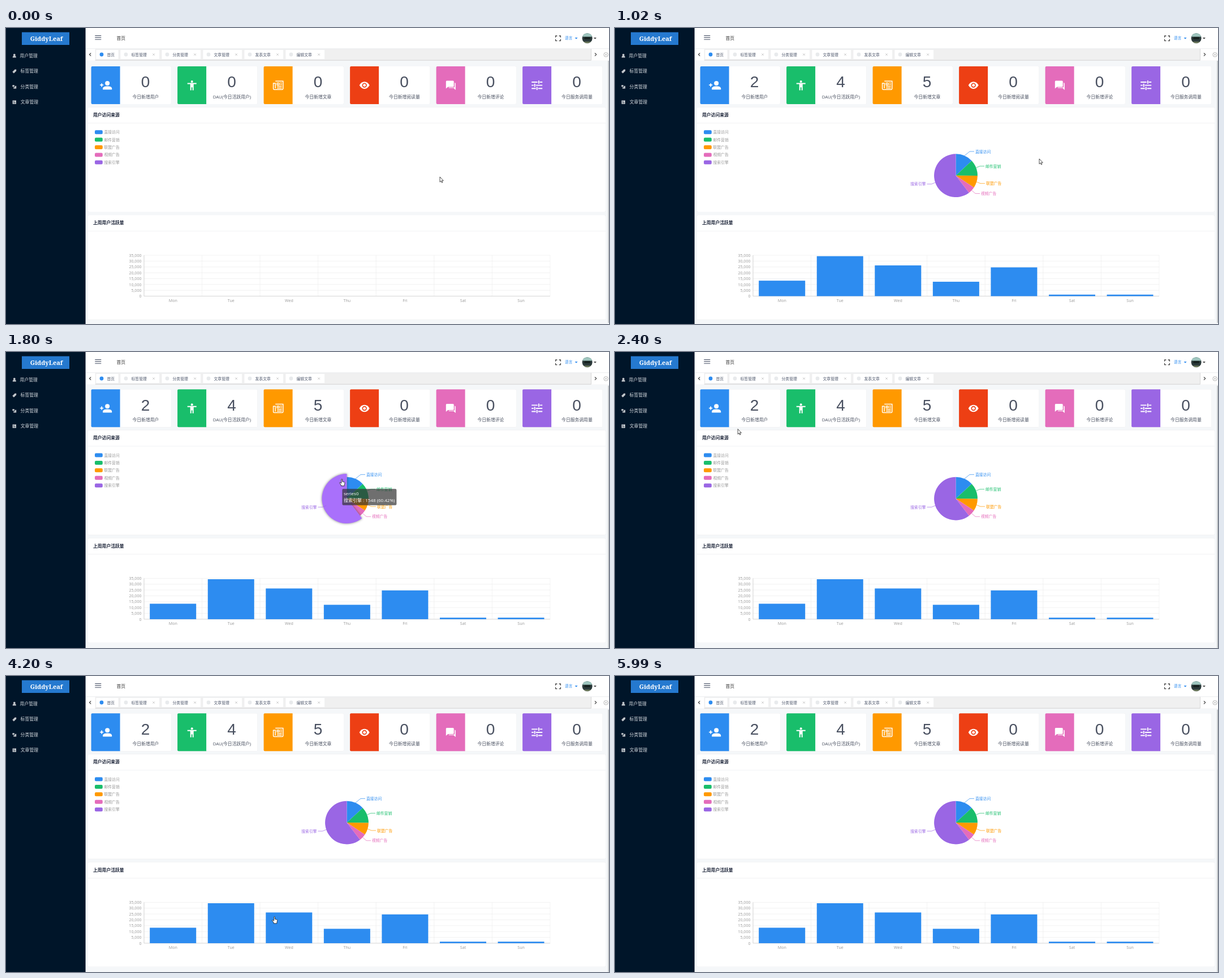
These frames come from a looping animation (1066x525 px, 7010 ms). An HTML page:

```html
<!DOCTYPE html>
<html lang="zh-CN">
<head>
<meta charset="utf-8">
<title>Dashboard</title>
<style>
html, body { margin: 0; width: 100%; height: 100%; overflow: hidden; background: #f5f7f9; }
svg { display: block; width: 1066px; height: 525px; }
text { font-family: "Open Sans", "Noto Sans CJK SC", "Noto Sans CJK", sans-serif; white-space: pre; }
.num { font-family: "Liberation Sans", sans-serif; }
.brand { font-family: "Noto Serif", serif; font-weight: 700; }
.card { filter: drop-shadow(0 .6px .5px rgba(0, 0, 0, .12)); }
.lift { filter: drop-shadow(0 0 2px rgba(0, 0, 0, .5)); }
</style>
</head>
<body>
<svg id="stage" viewBox="0 0 1066 525"></svg>
<script>
const LOOP = 7010, TICK = 77.6, FIRST = 90;
const BLUE = '#2d8cf0', GREEN = '#19be6b', ORANGE = '#ff9900', RED = '#ed3f14', PINK = '#e46cbb', PURPLE = '#9a66e4';
const PIE = { x: 602.5, y: 261.7, r: 38.4, big: 44 };
const AXIS = { x: 244, y: 475.6, col: 102.55, h: 72.5, max: 35000 };

const rect = (x, y, w, h, fill, more = '') => `<rect x="${x}" y="${y}" width="${w}" height="${h}" fill="${fill}" ${more}/>`;
const path = (d, fill, more = '') => `<path d="${d}" fill="${fill}" ${more}/>`;
const line = (d, color, w = 1, more = '') => path(d, 'none', `stroke="${color}" stroke-width="${w}" ${more}`);
const dot = (x, y, r, fill, more = '') => `<circle cx="${x}" cy="${y}" r="${r}" fill="${fill}" ${more}/>`;
const text = (s, x, y, size, fill, more = '') =>
  `<text x="${x}" y="${y + size * .37}" font-size="${size}" fill="${fill}" ${more}>${s}</text>`;
const MID = 'text-anchor="middle"', END = 'text-anchor="end"';

// Icons are drawn around 0,0
const icons = [
  dot(3, -3.6, 4, '#fff') + path('M-5 7.6v-2q0-4 8-4t8 4v2z', '#fff') + line('M-7-3.4v6M-10-.4h6', '#fff', 1.8),
  dot(0, -6.6, 2, '#fff') + path('M-8-4.2H8v2H3V8.8H1V3.6H-1V8.8H-3V-2.2H-8z', '#fff'),
  line('M-5-7.4H8.6V6q0 1.6-1.6 1.6H-7Q-8.6 7.6-8.6 6V-3.6H-5V5.5M-2-4H1.6V-.6H-2zM3.6-4H6.5M3.6-1H6.5M-2 2H6.5M-2 4.8H6.5', '#fff', 1.5),
  path('M-9 0Q-5.5-6.3 0-6.3T9 0Q5.5 6.3 0 6.3T-9 0z', '#fff') + dot(0, 0, 4.2, RED) + dot(0, 0, 2.5, '#fff'),
  path('M-7-8H4q1.5 0 1.5 1.5V1.5Q5.5 3 4 3H-5l-3.4 3V-6.5Q-8.4-8-7-8zM7-4.5q1.6 0 1.6 1.6V8.4L5.2 5H-2.5q-1.2 0-1.2-1H5.4Q7 4 7 2.4z', '#fff'),
  line('M-9.5-5.6H1M5-5.6H9.5M3.2-8.4v5.6M-9.5 0H-6M-2 0H9.5M-4-2.8v5.6M-9.5 5.6H-2M2 5.6H9.5M0 2.8v5.6', '#fff', 1.9)
];
const cards = [
  ['今日新增用户', BLUE, 2, 85], ['DAU(今日活跃用户)', GREEN, 4, 210], ['今日新增文章', ORANGE, 5, 210],
  ['今日新增阅读量', RED, 0, 210], ['今日新增评论', PINK, 0, 210], ['今日服务调用量', PURPLE, 0, 210]
];
// name, value, colour, hover colour, label elbow
const slices = [
  ['直接访问', 335, BLUE, '#329aff', 627, 219], ['邮件营销', 310, GREEN, '#1cd176', 645, 245],
  ['联盟广告', 234, ORANGE, '#ffa800', 646, 275.7], ['视频广告', 135, PINK, '#fb77ce', 637, 293.6],
  ['搜索引擎', 1548, PURPLE, '#a970fb', 559.5, 276.8]
];
const total = slices.reduce((sum, s) => sum + s[1], 0);
const days = [['Mon', 13253], ['Tue', 34235], ['Wed', 26321], ['Thu', 12340], ['Fri', 24643], ['Sat', 1322], ['Sun', 1324]];
let turn = 0;
const arcs = slices.map(s => [turn, turn += s[1] / total]);

const polar = (a, r) => [PIE.x + r * Math.sin(a * 2 * Math.PI), PIE.y - r * Math.cos(a * 2 * Math.PI)];
function sector(a, b, r) {
  b = Math.min(b, a + .9999);
  return `M${PIE.x} ${PIE.y}L${polar(a, r)}A${r} ${r} 0 ${b - a > .5 ? 1 : 0} 1 ${polar(b, r)}Z`;
}

function cardView([label, color], i) {
  const x = 150.6 + i * 152.5;
  return `<g class="card">${rect(x, 68, 141.5, 67, '#fff', 'rx="2"')}</g>` +
    path(`M${x + 51} 68v67h-49q-2 0-2-2v-63q0-2 2-2z`, color) +
    `<g transform="translate(${x + 25.6} 101.6)">${icons[i]}</g>` +
    text('0', x + 96, 95, 28, '#495060', `class="num" ${MID}`) +
    text(label, x + 96.3, 122, 7.8, '#495060', MID);
}
const panel = (y, h, title) => `<g class="card">${rect(145, y, 915, h, '#fff', 'rx="2"')}</g>` +
  line(`M145 ${y + 28.2}H1060`, '#e8eaec', .6) + text(title, 154, y + 13.6, 7.8, '#1c2438', 'font-weight="700"');

function pieView() {
  return slices.map(([name, , color, , x, y], i) => {
    const [a, b] = arcs[i], dir = i === 4 ? -1 : 1;
    return path(sector(a, b, PIE.r), color, 'class="slice"') +
      line(`M${polar((a + b) / 2, PIE.r)}L${x} ${y}h${8 * dir}`, color, .7) +
      text(name, x + 10 * dir, y, 6.8, color, dir < 0 ? END : '');
  }).join('');
}
function gridView() {
  let out = '';
  for (let i = 0; i <= 7; i++) {
    const y = AXIS.y - i * AXIS.h / 7, x = AXIS.x + i * AXIS.col;
    out += line(`M${AXIS.x} ${y}h${AXIS.col * 7}M${x} ${AXIS.y}v${-AXIS.h}`, '#e9e9e9', .6) +
      text((i * 5000).toLocaleString('en-US'), 239.5, y, 7.1, '#999', END);
  }
  out += line(`M${AXIS.x} ${AXIS.y - AXIS.h}V${AXIS.y}H${AXIS.x + AXIS.col * 7}`, '#ccc', .7);
  return out + days.map(([d], i) => text(d, AXIS.x + (i + .5) * AXIS.col, 483.5, 7.1, '#999', MID) +
    rect(AXIS.x + i * AXIS.col + 10.2, 0, 82, 0, BLUE, 'class="bar"')).join('');
}

function tabsView() {
  const names = ['首页', '标签管理', '分类管理', '文章管理', '发表文章', '编辑文章'];
  return names.map((n, i) => {
    const x = i ? 202 + (i - 1) * 73 : 159;
    return rect(x, 38.5, i ? 69.5 : 40, 17, '#fff', 'rx="1.2" stroke="#e8eaec" stroke-width=".5"') +
      dot(x + 10, 47, 3.4, i ? '#e8eaec' : BLUE) + text(n, x + 19.5, 47, 6.85, '#515a6e') +
      (i ? line(`M${x + 57.3} 45.3l3.6 3.6m0-3.6l-3.6 3.6`, '#aaa', .6) : '');
  }).join('');
}
function sideView() {
  const menu = [['用户管理', 24.6, 49], ['标签管理', 25.6, 76.5], ['分类管理', 25.6, 104], ['文章管理', 25.8, 131.3]];
  const glyphs = [
    dot(0, -1.6, 1.9, '#c3c7cc') + path('M-3 3.2Q-3.4-.4 0-.4T3 3.2z', '#c3c7cc'),
    path('M-3.5 1L.8-3.2H3.4V-.6L-1 3.6z', '#c3c7cc'),
    path('M-3.4-3H0V0H-3.4zM.8-1.5H3.4V3.2H-1.5V1H.8z', '#c3c7cc'),
    path('M-3.2-3.2H3.2V3.2H-3.2z', '#c3c7cc') + line('M-1.7-1.4H.2M-1.7 1H1.8', '#001529', .8)
  ];
  return rect(0, 0, 140.6, 525, '#001529') + rect(28, 7.5, 84, 22.5, '#2579cf') +
    text('GiddyLeaf', 71.5, 18.6, 11, '#fff', `class="brand" ${MID}`) +
    menu.map(([n, x, y], i) => `<g transform="translate(14.8 ${y + .3})">${glyphs[i]}</g>` + text(n, x, y, 7.8, '#d5d9de')).join('');
}
function headView() {
  return rect(140.6, 0, 926, 36.6, '#fff') + rect(140.6, 36.6, 926, 21, '#f0f0f0') +
    line('M140.6 36.8H1066', '#e3e5e8', .6) + line('M157.5 57.2H1034', '#d2d2d2', .9) +
    rect(140.6, 37.2, 17, 20.4, '#fff') + rect(1034.5, 37.2, 31.5, 20.4, '#fff') +
    line('M1034.5 37V57.5', '#ccc', .7) +
    line('M150.2 44.3l-2.7 2.7l2.7 2.7M1041 44.3l2.7 2.7l-2.7 2.7', '#333', 1.1) +
    dot(1060.6, 47.3, 3.8, 'none', 'stroke="#888" stroke-width=".6"') + line('M1059.1 45.8l3 3m0-3l-3 3', '#888', .6) +
    line('M157.3 13.6h11M157.3 17.1h11M157.3 20.5h11', '#515a6e', 1.1) +
    text('首页', 195.4, 18, 7.8, '#333') +
    line('M974.4 14h-2.8v2.8M977.6 14h2.8v2.8M974.4 22.6h-2.8v-2.8M977.6 22.6h2.8v-2.8', '#444', 1.3) +
    text('语言', 988, 17.7, 6.7, BLUE) + path('M1005.6 17h5l-2.5 2.7z', BLUE) +
    dot(1027.6, 18.2, 9, '#2c3a3b') + path('M1019 15.5a9 9 0 0 1 17.2 0z', '#9dc4bd') +
    rect(1022, 16, 11, 4, '#16211f', 'rx="1.5"') + path('M1021 24.3h13.2a9 9 0 0 1-13.2 0z', '#6f7c5e') +
    path('M1038.9 17h5l-2.5 2.7z', '#444') + tabsView();
}

const stage = document.getElementById('stage');
stage.innerHTML = `<clipPath id="sweep"><path/></clipPath>` + rect(0, 0, 1066, 525, '#f5f7f9') +
  `<g id="page">${cards.map(cardView).join('')}${panel(140.5, 185.5, '用户访问来源')}${panel(332, 185.5, '上周用户活跃量')}` +
  slices.map(([n, , c], i) => rect(157, 181.2 + i * 13.4, 13.8, 7, c, 'rx="2"') + text(n, 173.5, 184.7 + i * 13.4, 6.8, '#999')).join('') +
  `${gridView()}<g clip-path="url(#sweep)">${pieView()}</g></g>` +
  rect(1064.2, 58, 1.8, 465, '#c4c6c9', 'id="thumb"') + headView() + sideView() +
  rect(0, 0, 1066, 1.3, BLUE, 'id="load"') +
  `<g id="tip">${rect(0, 0, 96, 29, 'rgba(50,50,50,.7)', 'rx="2.2"')}${text('series0', 2.6, 8.6, 8, '#fff')}${text('', 2.6, 20.4, 8, '#fff')}</g>` +
  `<g id="arrow">${path('M0 0V9.2L2.1 7.3L3.5 10.4L4.9 9.8L3.5 6.8H6.3z', '#fff', 'stroke="#000" stroke-width=".7"')}</g>` +
  `<g id="hand">${path('M-.9 0Q0-1 .9 0V4L4.6 5Q5.4 5.3 5.2 6.4L4.4 9.6V11.6H-1.4V10L-4 6.6Q-4.2 5.2-2.8 5.6L-.9 7z', '#fff', 'stroke="#000" stroke-width=".7"')}</g>`;

const $ = id => document.getElementById(id);
const all = sel => [...stage.querySelectorAll(sel)];
const nums = all('.num'), bars = all('.bar'), wedges = all('.slice');
const sweep = stage.querySelector('#sweep path'), tipText = all('#tip text')[1], tipBox = stage.querySelector('#tip rect');
const place = (el, x, y) => el.setAttribute('transform', `translate(${x} ${y})`);
const show = (el, on) => el.style.display = on ? '' : 'none';
const clamp = v => Math.max(0, Math.min(1, v));
const cubicOut = p => 1 - (1 - p) ** 3;
const expoOut = p => p >= 1 ? 1 : 1 - 2 ** (-10 * p);

// Pointer path: time, x, y
const route = [
  [0, 767, 264], [846, 767, 264], [1001, 750, 232], [1500, 750, 232], [1777, 594, 226], [1950, 420, 140], [2110, 310, 82],
  [2260, 243, 115], [2420, 213, 140], [2700, 450, 82], [3020, 793, 124], [3250, 775, 190], [3484, 727, 298], [3720, 736, 445],
  [4130, 405, 425], [4480, 866, 440], [4720, 1000, 360], [4870, 1056, 310], [4940, 1075, 300],
  [5400, 1075, 300], [5490, 1053, 300], [5650, 1075, 290], [5800, 1075, 290], [5880, 1053, 290], [5960, 1075, 290], [LOOP, 1075, 290]
];
function pointer(t) {
  const i = route.findIndex(k => k[0] > t), a = route[i - 1], b = route[i];
  const p = (t - a[0]) / (b[0] - a[0]);
  return [a[1] + (b[1] - a[1]) * p, a[2] + (b[2] - a[2]) * p];
}
function sliceAt(x, y) {
  const dx = x - PIE.x, dy = y - PIE.y;
  if (Math.hypot(dx, dy) > PIE.big) return -1;
  const a = (Math.atan2(dx, -dy) / (2 * Math.PI) + 1) % 1;
  return arcs.findIndex(([from, to]) => a >= from && a < to);
}

function draw(now) {
  const real = now % LOOP;
  const t = real < FIRST ? 0 : 70 + TICK * Math.floor((real - 70) / TICK);
  const p = t ? clamp((t + 11) / 1000) : 0;
  const scroll = 1.67 * clamp((t - 1079) / 232);
  place($('page'), 0, -scroll);

  cards.forEach(([, , n, start], i) => nums[i].textContent = Math.round(n * expoOut(clamp((t - start) / 800))));
  days.forEach(([, v], i) => {
    const h = v / AXIS.max * AXIS.h * expoOut(p);
    bars[i].setAttribute('height', h);
    bars[i].setAttribute('y', AXIS.y - h);
  });
  sweep.setAttribute('d', p ? sector(0, cubicOut(p), 600) : 'M0 0');

  const [x, y] = pointer(t), over = sliceAt(x, y + scroll);
  wedges.forEach((w, i) => {
    const on = i === over;
    w.setAttribute('d', sector(...arcs[i], on ? PIE.big : PIE.r));
    w.setAttribute('fill', slices[i][on ? 3 : 2]);
    w.setAttribute('class', on ? 'slice lift' : 'slice');
  });
  show($('tip'), over >= 0);
  if (over >= 0) {
    const [name, v] = slices[over];
    tipText.textContent = `${name} : ${v} (${(v / total * 100).toFixed(2)}%)`;
    tipBox.setAttribute('width', v > 999 ? 96 : 91.5);
    place($('tip'), x + .6, y + 16.8);
  }

  const col = Math.floor((x - AXIS.x) / AXIS.col), inCol = x - AXIS.x - col * AXIS.col - 10.2;
  const onBar = days[col] && inCol > 0 && inCol < 82 && y < AXIS.y && y > AXIS.y - days[col][1] / AXIS.max * AXIS.h;
  const hand = over >= 0 || onBar;
  show($('hand'), hand);
  show($('arrow'), !hand);
  place($(hand ? 'hand' : 'arrow'), x, y);

  $('thumb').setAttribute('y', 58 + scroll);
  $('thumb').setAttribute('fill', x > 1050 && x < 1070 ? '#a8a8a8' : '#c4c6c9');
  $('load').setAttribute('opacity', t ? 1 - clamp((t - 780) / 215) : 0);
}
function frame(now) {
  draw(now);
  requestAnimationFrame(frame);
}
draw(0);
requestAnimationFrame(frame);
</script>
</body>
</html>
```
